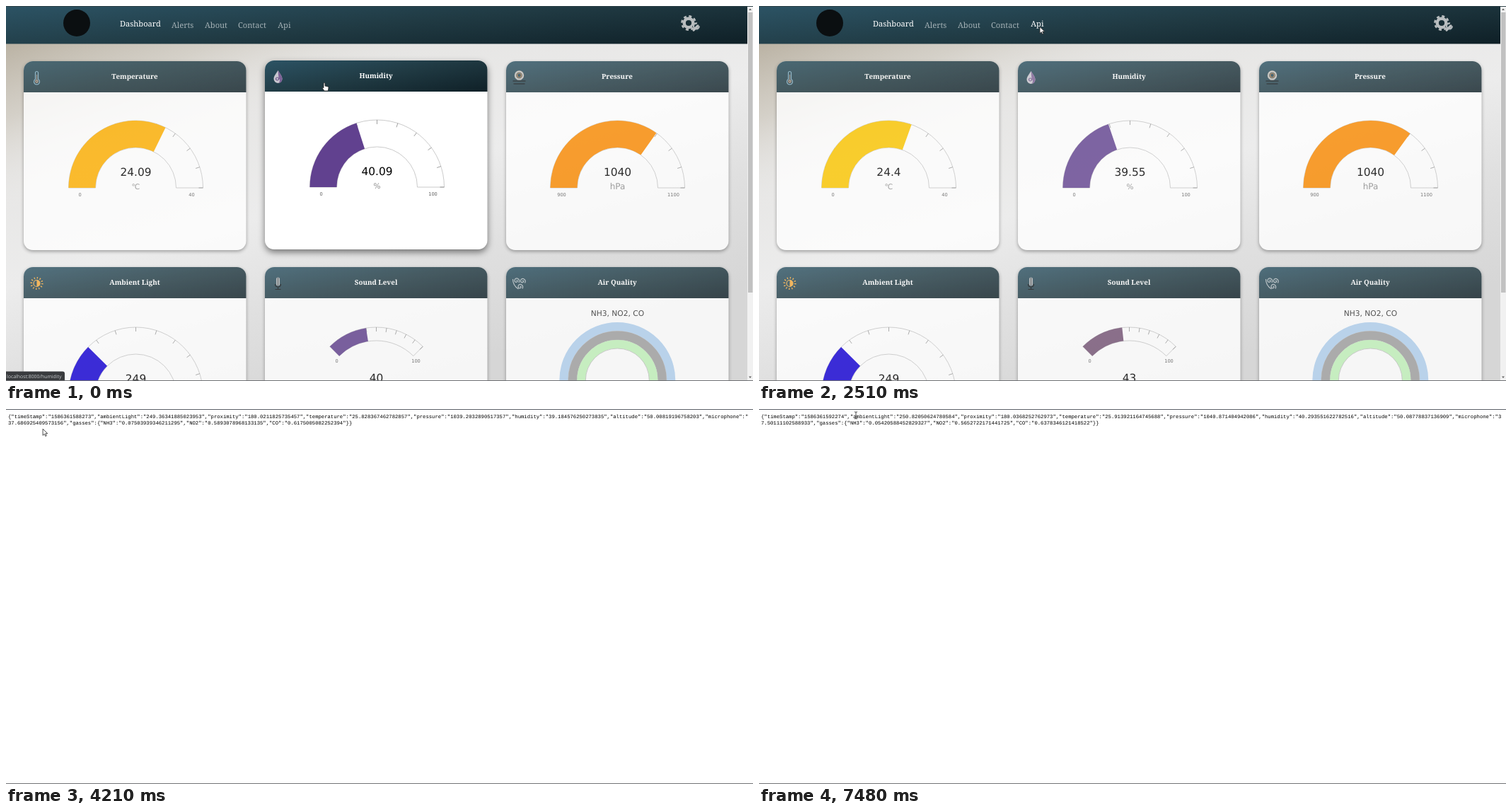
These frames come from a looping animation (1056x530 px, 8000 ms). An HTML page:

```html
<!DOCTYPE html>
<html lang="en">
<head>
<meta charset="utf-8">
<title>Sensor dashboard</title>
<style>
  html, body { margin: 0; width: 100%; height: 100%; overflow: hidden; background: #fff; }
  svg { display: block; width: 1056px; height: 530px; }
  text { text-rendering: geometricPrecision; white-space: pre; }
  .nav { font: 11.1px "Noto Serif", serif; fill: #a3b0b5; }
  .on { fill: #fff; }
  .title { font: bold 9.8px "Noto Serif", serif; fill: #fff; text-anchor: middle; }
  .value, .unit, .label, .gas { font-family: "DejaVu Sans", sans-serif; text-anchor: middle; }
  .value { font-size: 15.4px; fill: #000; }
  .unit { font-size: 12px; fill: #8c8c8c; }
  .label { font-size: 6.6px; fill: #5a5a5a; }
  .gas { font-size: 10.7px; fill: #333; }
  .status { font: 6.9px "Open Sans", sans-serif; fill: #c6c9cb; }
  .json { font: 7.246px "Liberation Mono", monospace; fill: #000; }
  .body { filter: drop-shadow(0 2px 2.5px rgba(0, 0, 0, .42)); }
  .lift { filter: drop-shadow(0 4px 5px rgba(0, 0, 0, .5)); }
  .rim { fill: #fff; stroke: #bdbdbd; stroke-width: .8; }
  .tick { stroke: #777; stroke-width: .7; fill: none; }
  .icon { fill: none; stroke-width: 1.2; }
</style>
</head>
<body>
<svg id="stage" viewBox="0 0 1056 530">
  <defs>
    <linearGradient id="navFill" gradientUnits="userSpaceOnUse" x1="517.7" y1="-45" x2="530.3" y2="98">
      <stop stop-color="#2c5364"/><stop offset=".5" stop-color="#203a43"/><stop offset="1" stop-color="#0f2027"/>
    </linearGradient>
    <linearGradient id="headFill" gradientUnits="userSpaceOnUse" x1="148.5" y1="-26" x2="165.5" y2="70">
      <stop stop-color="#2c5364"/><stop offset=".5" stop-color="#203a43"/><stop offset="1" stop-color="#0f2027"/>
    </linearGradient>
    <linearGradient id="wall" gradientUnits="userSpaceOnUse" x1="420" y1="40" x2="560" y2="530">
      <stop stop-color="#e4e3e1"/><stop offset=".45" stop-color="#ececec"/>
      <stop offset=".7" stop-color="#e0e0e0"/><stop offset="1" stop-color="#d6d6d6"/>
    </linearGradient>
    <linearGradient id="warm" gradientUnits="userSpaceOnUse" x1="0" y1="50" x2="75" y2="265">
      <stop stop-color="#b9b1a2"/><stop offset=".45" stop-color="#cfcac0" stop-opacity=".75"/>
      <stop offset="1" stop-color="#efefef" stop-opacity="0"/>
    </linearGradient>
  </defs>

  <g id="dash">
    <rect width="1056" height="530" fill="url(#wall)"/>
    <rect width="1048" height="530" fill="url(#warm)"/>
    <rect width="1048" height="53.5" fill="url(#navFill)"/>
    <circle cx="100" cy="24" r="19" fill="#0b0f11"/>
    <text class="nav on" x="161" y="29">Dashboard</text>
    <text class="nav" x="234" y="30.6">Alerts</text>
    <text class="nav" x="281" y="30.6">About</text>
    <text class="nav" x="328" y="30.6">Contact</text>
    <text class="nav" id="api" x="384.3" y="30.6">Api</text>
    <g fill="none" stroke="#b9bdbf">
      <circle cx="965" cy="24" r="6.3" stroke-width="4.4"/>
      <circle cx="965" cy="24" r="9.6" stroke-width="2.6" stroke-dasharray="4 3.54"/>
      <path d="M972 27l7 7" stroke="#1c343d" stroke-width="6"/>
      <path d="M972 34l6-6" stroke-width="3.2" stroke-linecap="round"/>
      <path d="M977 24.5a4 4 0 1 0 3 4" stroke-width="2"/>
    </g>
    <g id="cards"></g>
    <rect x="1048" width="8" height="530" fill="#f1f1f1"/>
    <rect x="1049" y="9" width="6.5" height="396" fill="#c1c1c1"/>
    <path d="M1050 6l2-2.5 2 2.5zM1050 523.500l2 2.500 2-2.500z" fill="#666"/>
    <g id="status">
      <path d="M0 516.500h80q3 0 3 3V530H0z" fill="#393b3e"/>
      <text class="status" x="1" y="525.6">localhost:8000/humidity</text>
    </g>
  </g>

  <rect id="dark" width="1056" height="530" fill="#363639"/>

  <g id="page">
    <rect width="1056" height="530" fill="#fff"/>
    <rect id="mark" x="42.1" y="5.500" height="9" fill="#3297fd"/>
    <text class="json" x="3" y="12.500"><tspan id="pre"></tspan><tspan id="sel" fill="#fff"></tspan><tspan id="post"></tspan></text>
    <text class="json" id="row2" x="3" y="22"></text>
  </g>

  <rect id="top" width="1056" height="1" fill="#34474d"/>
  <rect id="foot" y="529" width="1056" height="1" fill="#707275"/>

  <path id="arrow" d="M.5.5v9.200l2.200-2 1.500 3.200 1.500-.700-1.500-3.100h3z" fill="#fff" stroke="#222" stroke-width=".8"/>
  <path id="hand" d="M-1 1q1-1.500 2 0v4l4.200 1q1 .400.800 1.800l-.800 4.200H0l-2.800-4q.200-1.700 1.800-.200z" fill="#fff" stroke="#222" stroke-width=".8"/>
  <path id="beam" d="M-2-5q1.500 0 2 .8q.5-.8 2-.8M0-4.200v8.400M-2 5q1.500 0 2-.8q.5.8 2 .8" fill="none" stroke="#333" stroke-width=".9"/>
</svg>

<script>
const $ = id => document.getElementById(id);
const LOOP = 8000, CHAR = 4.349;

// Ring sector between two angles in degrees, counted anticlockwise from the right
function sector(cx, cy, R, r, from, to) {
  const at = (rad, deg) => {
    const a = deg * Math.PI / 180;
    return (cx + rad * Math.cos(a)).toFixed(2) + ' ' + (cy - rad * Math.sin(a)).toFixed(2);
  };
  return `M${at(R, from)}A${R} ${R} 0 0 1 ${at(R, to)}L${at(r, to)}A${r} ${r} 0 0 0 ${at(r, from)}Z`;
}

const round = { R: 95, r: 57, from: 180, to: 0, label: 79, drop: 12.3 };
const bow = { R: 93, r: 74, from: 135, to: 45, label: 56, drop: -43 };

const icons = {
  temp: `<path d="M-2 2.500v-9a2 2 0 0 1 4 0v9a4 4 0 1 1-4 0z" stroke="#86b4cb"/><circle cy="5.500" r="1.600" stroke="#d5b096"/><path d="M0 4v-8" stroke="#93887f"/>`,
  hum: `<path d="M0-9C3-4 6-1 6 3a6 6 0 0 1-12 0C-6-1-3-4 0-9z" fill="#c9c6cf"/><path d="M0-9C3-4 6-1 6 3a6 6 0 0 1-5 5.900q3-4 0-7z" fill="#7e6397"/><circle cx="-1" cy="3" r="2" stroke="#6d5488"/>`,
  press: `<circle cy="-3" r="5.500" stroke="#c4bfb8" stroke-width="2.400"/><circle cy="-3" r="3" stroke="#bd8450"/><path d="M-9 5H9M-8 9H8" stroke="#050505"/><path d="M-3 3h6" stroke="#aaa"/>`,
  light: `<circle r="7.800" stroke="#f4a93c" stroke-width="2.600" stroke-dasharray="1.300 2.784"/><circle r="4.500" stroke="#f4b04a"/><path d="M0-4.500a4.500 4.500 0 0 1 0 9z" fill="#f4a93c"/>`,
  sound: `<rect x="-2.500" y="-8.500" width="5" height="12" rx="2.500" fill="#a9adaf"/><path d="M0-8v11" stroke="#4d5559"/><path d="M-4 1q0 4 4 4t4-4M0 5v3M-4 8.500h8" stroke="#0d1113"/>`,
  air: `<g stroke="#b4bfc3">${[[-4, -4], [4.5, -3.500], [1, 4.5]].map(([x, y]) =>
    `<path transform="translate(${x} ${y})" d="M0 0q2-1 1.500 1.500q-3 2-4-1q0-4 4-3.500q4 2 2 6"/>`).join('')}<path d="M-9-6q0 9 8 14"/></g>`
};

const cards = [
  { id: 'temp', title: 'Temperature', x: 25, y: 78, cx: 158.5, cy: 179, g: round, min: 0, max: 40, unit: '℃', size: 10.5 },
  { id: 'hum', title: 'Humidity', x: 366, y: 78, cx: 158.5, cy: 179, g: round, min: 0, max: 100, unit: '%', size: 10.5 },
  { id: 'press', title: 'Pressure', x: 707, y: 78, cx: 157.5, cy: 179, g: round, min: 900, max: 1100, unit: 'hPa', size: 12 },
  { id: 'light', title: 'Ambient Light', x: 25, y: 369, cx: 158.5, cy: 180, g: round, min: 0, max: 1000 },
  { id: 'sound', title: 'Sound Level', x: 366, y: 369, cx: 157.5, cy: 178, g: bow, min: 0, max: 100 },
  { id: 'air', title: 'Air Quality', x: 707, y: 369 }
];

function gauge(c) {
  const { R, r, from, to, label, drop } = c.g;
  let ticks = '';
  for (let i = 1; i <= 10; i++) {
    const a = (from + (to - from) * i / 10) * Math.PI / 180;
    const p = k => `${c.cx + k * Math.cos(a)} ${c.cy - k * Math.sin(a)}`;
    ticks += `M${p(R)}L${p(R - 6)}`;
  }
  const y = c.cy + drop;
  return `<path class="rim" d="${sector(c.cx, c.cy, R, r, from, to)}"/><path class="tick" d="${ticks}"/>
    <path id="${c.id}Arc"/>
    <text class="label" x="${c.cx - label}" y="${y}">${c.min}</text>
    <text class="label" x="${c.cx + label}" y="${y}">${c.max}</text>
    <text class="value" id="${c.id}Text" x="${c.cx}" y="${c.g === bow ? 161.5 : c.cy - 17.2}"></text>
    ${c.unit ? `<text class="unit" x="${c.cx}" y="${c.cy + 2}" font-size="${c.size}" style="font-size:${c.size}px">${c.unit}</text>` : ''}`;
}

function rings() {
  const bands = [[82, 69.5, '#b3d2f0'], [69.5, 57, '#a1a1a1'], [57, 45, '#c3f3bb']];
  return `<text class="gas" x="157.5" y="68.700">NH3, NO2, CO</text>` + bands.map(([R, r, fill]) =>
    `<circle cx="157.300" cy="160" r="${(R + r) / 2}" fill="none" stroke="${fill}" stroke-width="${R - r}"/>
     <circle cx="157.300" cy="160" r="${r}" fill="none" stroke="#b9b9b9" stroke-width=".8"/>`).join('');
}

$('cards').innerHTML = cards.map(c => `
  <g id="${c.id}" transform="translate(${c.x} ${c.y})" opacity=".8">
    <rect class="body" width="314.500" height="267" rx="13" fill="#fff"/>
    <path d="M0 44V13A13 13 0 0 1 13 0H301.500a13 13 0 0 1 13 13V44z" fill="url(#headFill)"/>
    <g class="icon" transform="translate(18.500 23)">${icons[c.id]}</g>
    <text class="title" x="157" y="25">${c.title}</text>
    ${c.g ? gauge(c) : rings()}
  </g>`).join('');
const hover = $('hum').querySelector('.body');

// Readings before, between and after the two updates
const readings = {
  temp: { v: [25.84, 24.09, 24.4], text: ['24.09', '24.09', '24.4'], rgb: [[255, 176, 0], [252, 205, 0], [253, 199, 0]] },
  hum: { v: [40.09, 40.09, 39.55], text: ['40.09', '40.09', '39.55'], rgb: [[97, 65, 143], [97, 65, 143], [99, 67, 145]] },
  press: { v: [1039.2, 1040, 1040], text: ['1040', '1040', '1040'], rgb: [[251, 138, 0], [251, 138, 0], [251, 138, 0]] },
  light: { v: [249, 249, 249], text: ['249', '249', '249'], rgb: [[19, 0, 213], [19, 0, 213], [19, 0, 213]] },
  sound: { v: [40, 38, 43], text: ['40', '38', '43'], rgb: [[97, 65, 142], [85, 52, 153], [118, 85, 118]] }
};

const json = [
  ['{"timeStamp":"1586361588273","ambientLight":"249.36341885023953","proximity":"180.0211825735457","temperature":"25.828367462782857","pressure":"1039.2032890517357","humidity":"39.184576250273835","altitude":"50.00819196758203","microphone":"',
   '37.686925409573156","gasses":{"NH3":"0.07503939346211295","NO2":"0.5893078968133135","CO":"0.6175005082252394"}}'],
  ['{"timeStamp":"1586361592274","ambientLight":"250.82050624780584","proximity":"180.0368252762973","temperature":"25.913921164745688","pressure":"1040.871404942086","humidity":"40.293551622782516","altitude":"50.08778837136909","microphone":"3',
   '7.50111102588933","gasses":{"NH3":"0.05420588452829327","NO2":"0.5652722171441725","CO":"0.6378346121418522"}}']
];

// Pointer path: time, x, y
const path = [
  [0, 450, 108], [70, 450, 108], [380, 432, 78], [690, 417.5, 62.5], [860, 416, 55], [920, 416, 55],
  [1570, 400, 37], [1870, 400, 37], [2450, 396.5, 29], [3700, 396.5, 29], [3960, 54, 29],
  [4180, 54, 29], [4450, 33, 17], [4740, 42.5, 10], [4870, 42.5, 10], [5200, 133, 9], [5340, 133, 9],
  [5370, 137, 9], [LOOP, 137, 9]
];

const clamp = v => Math.min(1, Math.max(0, v));
const ease = (t, a, b) => (1 - Math.cos(Math.PI * clamp((t - a) / (b - a)))) / 2;
const show = (id, on) => $(id).setAttribute('visibility', on ? 'visible' : 'hidden');

function pointer(t) {
  const i = path.findIndex(p => p[0] > t), [a, b] = [path[i - 1], path[i]];
  const k = (t - a[0]) / (b[0] - a[0]);
  return [a[1] + (b[1] - a[1]) * k, a[2] + (b[2] - a[2]) * k];
}

function drawDash(t) {
  const k1 = ease(t, 70, 680), k2 = ease(t, 930, 1560);
  const step = t < 70 ? 0 : t < 930 ? 1 : 2;
  const mix = ([a, b, c]) => a + (b - a) * k1 + (c - b) * k2;
  for (const c of cards) {
    const d = readings[c.id];
    if (!d) continue;
    const f = (mix(d.v) - c.min) / (c.max - c.min), { R, r, from, to } = c.g;
    const arc = $(c.id + 'Arc');
    arc.setAttribute('d', sector(c.cx, c.cy, R, r, from, from + (to - from) * f));
    arc.setAttribute('fill', `rgb(${[0, 1, 2].map(i => Math.round(mix(d.rgb.map(p => p[i]))))})`);
    $(c.id + 'Text').textContent = d.text[step];
  }
  const up = 1 - ease(t, 380, 640);
  $('hum').setAttribute('opacity', .8 + .2 * up);
  $('hum').setAttribute('transform', `translate(366 ${78 - up})`);
  hover.setAttribute('class', up > .5 ? 'body lift' : 'body');
  const over = t >= 2150;
  $('api').setAttribute('class', over ? 'nav on' : 'nav');
  $('api').setAttribute('y', over ? 29 : 30.6);
  show('status', t < 1100);
}

function drawPage(t, x) {
  const [row1, row2] = json[t < 6480 ? 0 : 1];
  const n = t < 4870 || t >= 6480 ? 0 : Math.min(21, Math.max(0, Math.round((x - 42.1) / CHAR)));
  $('mark').setAttribute('width', n * CHAR);
  $('pre').textContent = row1.slice(0, 9);
  $('sel').textContent = row1.slice(9, 9 + n);
  $('post').textContent = row1.slice(9 + n);
  $('row2').textContent = row2;
}

function frame() {
  const t = performance.now() % LOOP;
  const [x, y] = pointer(t);
  const dash = t < 2570, page = t >= 2670;
  show('dash', dash);
  show('dark', !dash && !page);
  show('page', page);
  show('foot', dash || page);
  $('top').setAttribute('fill', page ? '#5b6066' : dash ? '#34474d' : '#203d41');
  dash ? drawDash(t) : drawPage(t, x);
  const shape = t < 380 ? 'hand' : page && y < 24 ? 'beam' : 'arrow';
  for (const id of ['arrow', 'hand', 'beam']) show(id, id === shape);
  $(shape).setAttribute('transform', `translate(${x} ${y})`);
  requestAnimationFrame(frame);
}
frame();
</script>
</body>
</html>
```
